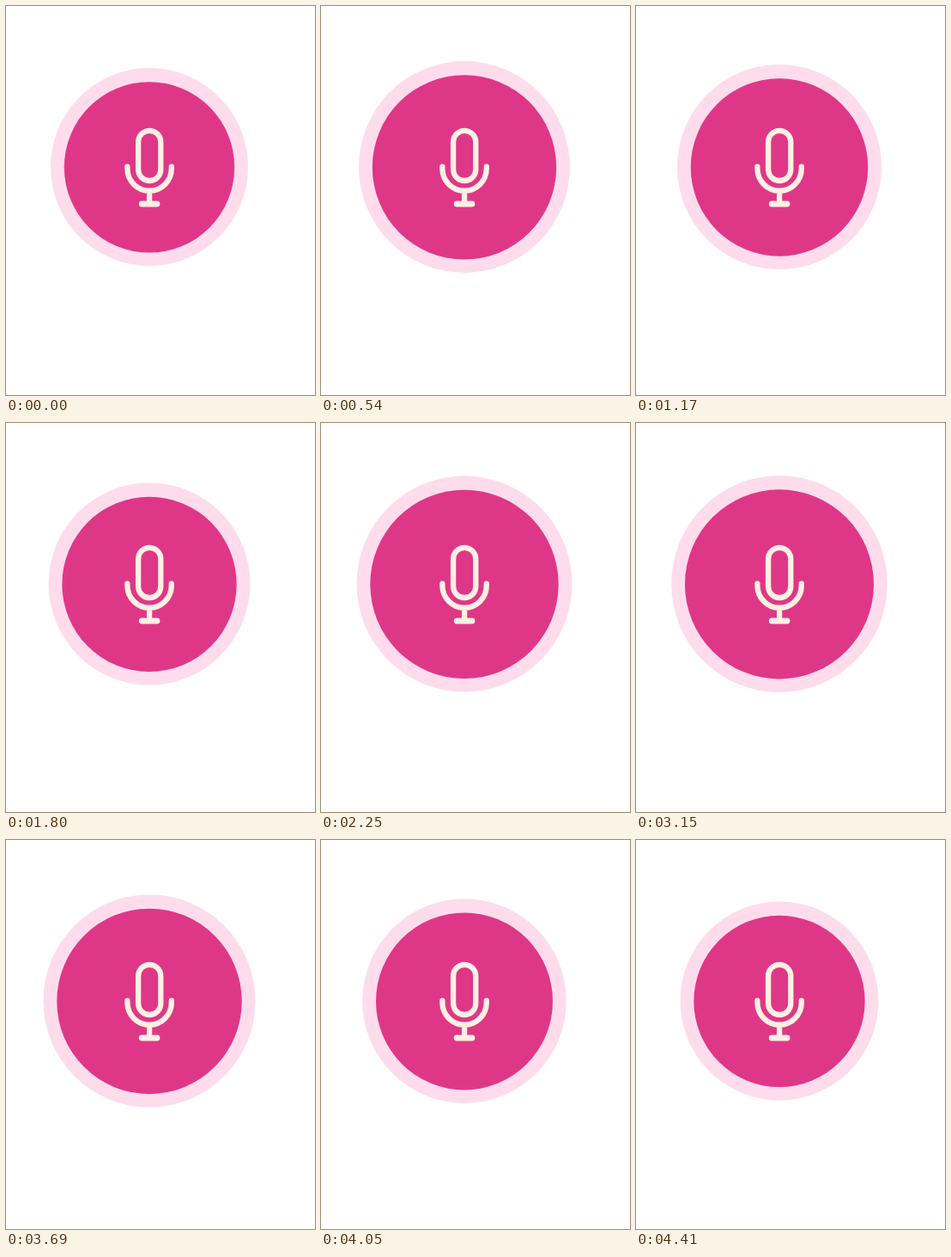
Recreate the animation shown at these times as an HTML page. Size 360x452 px, loop 4500 ms.

```html
<!DOCTYPE html>
<html lang="en">
<head>
<meta charset="utf-8">
<title>Pulsing microphone</title>
<style>
  html, body { margin: 0; width: 100%; height: 100%; overflow: hidden; background: #fff; }
  svg { display: block; width: 100vw; height: 100vh; }
</style>
</head>
<body>
<svg viewBox="0 0 360 452">
  <circle id="halo" cx="167" cy="187" r="115" fill="#fedcec"/>
  <circle id="disc" cx="167" cy="187.4" r="99" fill="#df3787"/>
  <g fill="none" stroke="#fef0e2" stroke-width="6.3" stroke-linecap="round">
    <rect x="154.1" y="144.8" width="26.2" height="58.2" rx="13.1"/>
    <path d="M141.4 186.6v2.4a25.7 25.7 0 0 0 51.4 0v-2.4M167.1 215v14"/>
    <path d="M158.2 230h17.8" stroke-width="6.8"/>
  </g>
</svg>
<script>
  const LOOP = 4500, STEP = 90, RING = 15.8;
  const halo = document.getElementById('halo');
  const disc = document.getElementById('disc');

  // Halo radius at evenly spaced beats, swelling and sinking like a voice
  const beats = [115, 117.4, 131, 118.7, 127.5, 116.3, 125.5, 115, 129, 120, 123.8, 118.2];

  const ease = u => u * u * (3 - 2 * u);

  function radius(t) {
    const pos = t / LOOP * beats.length, i = Math.floor(pos);
    const from = beats[i], to = beats[(i + 1) % beats.length];
    return from + (to - from) * ease(pos - i);
  }

  function draw(now) {
    const r = radius(Math.floor(now % LOOP / STEP) * STEP);
    halo.setAttribute('r', r);
    disc.setAttribute('r', r - RING);
  }

  const start = performance.now();
  function tick() {
    draw(performance.now() - start);
    requestAnimationFrame(tick);
  }
  tick();
</script>
</body>
</html>
```
